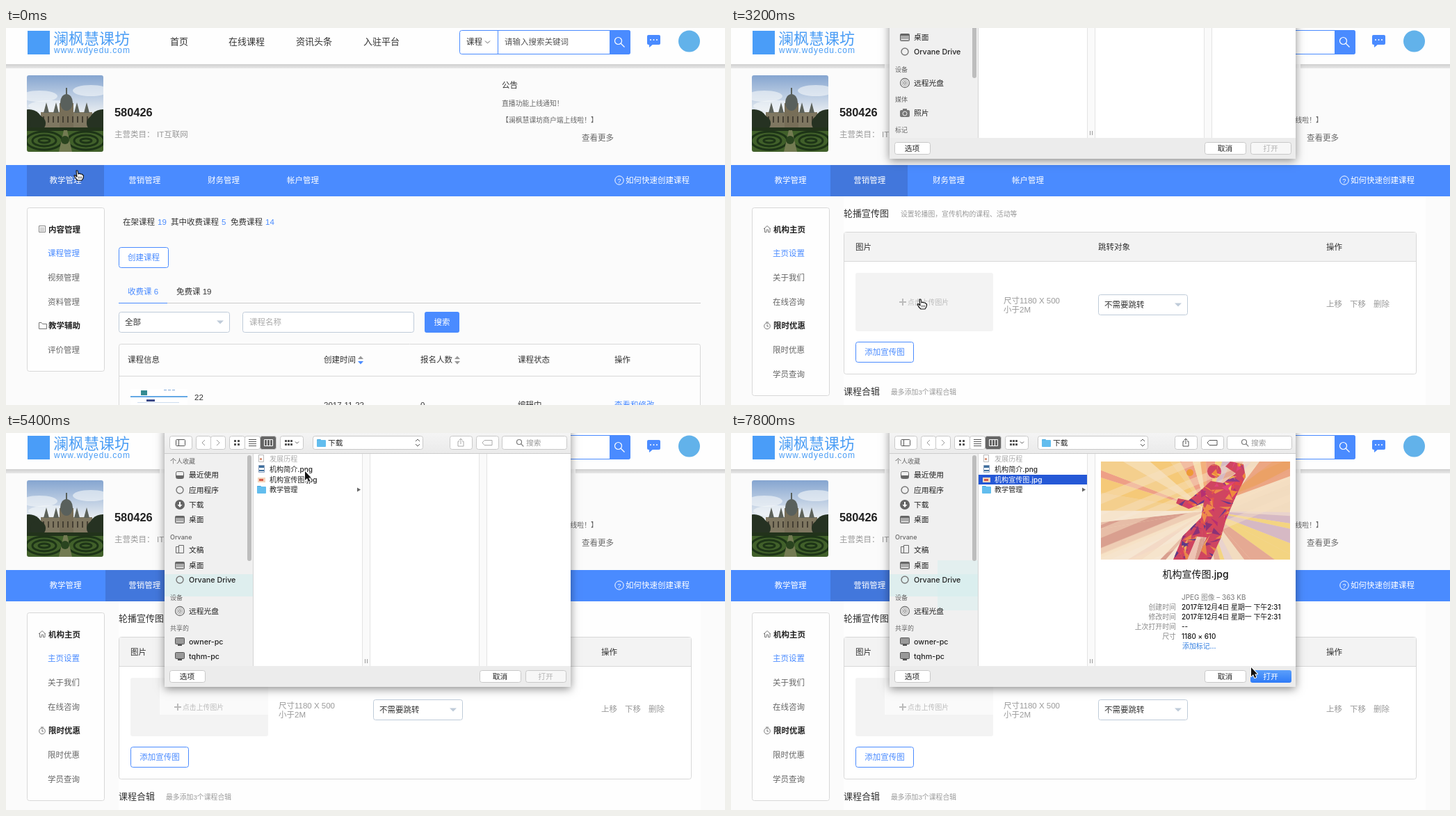
Animation, 1034 px wide and 542 px high, one loop 8000 ms. Source, as an HTML page with a canvas:

```html
<!DOCTYPE html>
<html lang="zh-CN">
<head>
<meta charset="utf-8">
<title>商户后台</title>
<style>
html, body { margin: 0; width: 100%; height: 100%; overflow: hidden; background: #fbfbfb; }
canvas { display: block; }
</style>
</head>
<body>
<canvas id="stage" width="1034" height="542"></canvas>
<script>
const c = document.getElementById('stage').getContext('2d');
const WEB = '"Liberation Sans", "Noto Sans CJK SC", "Noto Sans CJK", sans-serif';
const SYS = 'Inter, "Noto Sans CJK SC", "Noto Sans CJK", sans-serif';
const BLUE = '#4a8bff', INK = '#333', MID = '#666', PALE = '#999', LINE = '#d8d8d8', FIELD = '#bfcbd9';
const BRAND = '澜枫慧课坊';
const LOOP = 8000, STEP = 200;

// Text is placed by its left edge (or align) and its vertical centre.
function text(s, x, y, size = 11.5, color = INK, { weight = 400, align = 'left', font = WEB } = {}) {
  c.font = `${weight} ${size}px ${font}`;
  c.textAlign = align;
  c.fillStyle = color;
  c.fillText(s, x, y + size * 0.37);
}
const sys = (s, x, y, size, color, opt = {}) => text(s, x, y, size, color, { font: SYS, ...opt });

function rect(x, y, w, h, fill) {
  c.fillStyle = fill;
  c.fillRect(x, y, w, h);
}

function box(x, y, w, h, r, fill, stroke) {
  c.beginPath();
  c.roundRect(stroke ? x + 0.5 : x, stroke ? y + 0.5 : y, stroke ? w - 1 : w, stroke ? h - 1 : h, r);
  if (fill) { c.fillStyle = fill; c.fill(); }
  if (stroke) { c.strokeStyle = stroke; c.lineWidth = 1; c.stroke(); }
}

function trace(pts, close) {
  c.beginPath();
  for (let i = 0; i < pts.length; i += 2) c.lineTo(pts[i], pts[i + 1]);
  if (close) c.closePath();
}
function poly(pts, fill) { trace(pts, true); c.fillStyle = fill; c.fill(); }
function line(pts, color, width = 1) {
  trace(pts);
  c.strokeStyle = color;
  c.lineWidth = width;
  c.stroke();
}
function oval(x, y, rx, ry, fill) { c.beginPath(); c.ellipse(x, y, rx, ry, 0, 0, 7); c.fillStyle = fill; c.fill(); }
function disc(x, y, r, fill) { oval(x, y, r, r, fill); }
function ring(x, y, r, color, width = 1) {
  c.beginPath();
  c.arc(x, y, r, 0, 7);
  c.strokeStyle = color;
  c.lineWidth = width;
  c.stroke();
}
function fade(y0, y1, a, b) {
  const g = c.createLinearGradient(0, y0, 0, y1);
  g.addColorStop(0, a);
  g.addColorStop(1, b);
  return g;
}
function clipped(path, draw) {
  c.save();
  path();
  c.clip();
  draw();
  c.restore();
}
function lens(x, y, r, color) {
  ring(x, y, r, color, 1.2);
  line([x + r * 0.7, y + r * 0.7, x + r * 1.8, y + r * 1.8], color, 1.2);
}
function seeded(seed) {
  return () => (seed = (seed * 16807) % 2147483647) / 2147483647;
}

function header() {
  rect(0, 0, 1034, 52, '#fefefe');
  rect(0, 52, 1034, 6, fade(52, 58, '#cfcfcf', '#e8e8e8'));
  rect(31, 4, 32, 34, '#4a9df8');
  text(BRAND, 68, 15, 22, '#4a9df5', { weight: 500 });
  c.letterSpacing = '1px';
  text('www.wdyedu.com', 69, 32, 12, '#4a9df5');
  c.letterSpacing = '0px';
  ['首页', '在线课程', '资讯头条', '入驻平台'].forEach((s, i) => text(s, [236, 320, 417, 514][i], 19, 13));
  box(652, 3, 246, 35, 3, '#fff', BLUE);
  rect(707, 3, 1, 35, BLUE);
  box(868, 3, 30, 35, [0, 3, 3, 0], BLUE);
  text('课程', 662, 20);
  line([689, 18.5, 692.5, 22, 696, 18.5], MID);
  text('请输入搜索关键词', 717, 20, 11.5, '#555');
  lens(880.5, 18.5, 5, '#fff');
  box(922, 10, 19, 14, 2, BLUE);
  poly([925, 23, 931, 23, 925, 28], BLUE);
  for (const x of [927, 931.5, 936]) disc(x, 17, 1, '#fff');
  disc(982.5, 19, 15.5, '#62b2ea');
}

function photo() {
  clipped(() => { c.beginPath(); c.roundRect(30, 68, 110, 110, 3); }, () => {
    rect(30, 68, 110, 75, fade(68, 125, '#85a5d0', '#eef1f3'));
    for (const [x, y, w] of [[48, 98, 26], [122, 90, 26], [66, 112, 34]]) oval(x, y, w, 8, 'rgba(246,248,250,.6)');
    rect(50, 121, 74, 26, '#7f7761');
    rect(77, 108, 20, 39, '#776e58');
    oval(87, 107, 9, 12, '#59605c');
    rect(86, 86, 2, 11, '#59605c');
    for (const x of [58, 72, 102, 116]) poly([x - 4, 122, x, 107, x + 4, 122], '#5d625a');
    for (let x = 53; x < 122; x += 7) rect(x, 127, 2, 9, '#453f33');
    for (const [x, r] of [[33, 20], [46, 11], [127, 11], [139, 20]]) disc(x, 137, r, '#263222');
    rect(30, 146, 110, 32, '#41602a');
    rect(30, 143, 110, 5, '#22331b');
    for (const s of [-1, 1]) for (let i = 0; i < 3; i++) {
      c.beginPath();
      c.ellipse(85 + s * 30, 162, 8 + i * 9, 3 + i * 5, 0, 0, 7);
      c.strokeStyle = '#1d3417';
      c.lineWidth = 3;
      c.stroke();
    }
    poly([83, 147, 88, 147, 95, 178, 76, 178], '#737b52');
    disc(85, 161, 6, '#2a441f');
  });
}

function shop() {
  photo();
  text('580426', 156, 121, 16.4, '#222', { weight: 700 });
  text('主营类目：', 156, 153, 11.5, PALE);
  text('IT互联网', 217, 153, 11.5, PALE);
  text('公告', 713, 82);
  text('直播功能上线通知！', 713, 108, 9.85, MID);
  text(`【${BRAND}商户端上线啦！】`, 713, 132, 9.85, MID);
  text('查看更多', 828, 158, 11.5, MID);
}

function tabs(active) {
  rect(0, 197, 1034, 45, BLUE);
  rect(active ? 143 : 30, 197, 111, 45, '#4277dc');
  ['教学管理', '营销管理', '财务管理', '帐户管理'].forEach((s, i) => text(s, 62.5 + i * 113.8, 219, 11.5, '#fff'));
  ring(882, 219, 6.2, '#fff');
  text('?', 882, 219, 9.5, '#fff', { align: 'center' });
  text('如何快速创建课程', 891, 219, 11.5, '#fff');
}

// Entries starting with * are section heads; the first plain one is current.
function sidebar(items, h) {
  box(30, 258, 112, h, 3, '#fefefe', LINE);
  items.forEach((s, i) => {
    const y = 289.5 + i * 34.65;
    if (s[0] === '*') text(s.slice(1), 61, y, 11.5, '#222', { weight: 700 });
    else text(s, 60, y, 11.5, i === 1 ? BLUE : MID);
  });
}
function outlined(s, x, y, w) {
  box(x, y, w, 30, 3, '#fff', BLUE);
  text(s, x + w / 2, y + 14.5, 11.5, BLUE, { align: 'center' });
}
function picker(s, x, y, w) {
  box(x, y, w, 30, 3, '#fff', FIELD);
  text(s, x + 9, y + 15);
  const r = x + w - 19;
  poly([r, y + 12.5, r + 10, y + 12.5, r + 5, y + 17.5], FIELD);
}
function sorter(x, low) {
  poly([x - 4, 476, x + 4, 476, x, 471.5], '#999');
  poly([x - 4, 479, x + 4, 479, x, 483.5], low);
}

function courses() {
  sidebar(['*内容管理', '课程管理', '视频管理', '资料管理', '*教学辅助', '评价管理'], 236);
  box(47, 284, 10, 10, 0, null, '#888');
  for (const y of [287, 289, 291]) rect(49, y, 6, 1, '#aaa');
  line([47.5, 432.5, 47.5, 423.5, 51, 423.5, 52.5, 425.5, 58.5, 425.5, 58.5, 432.5, 47.5, 432.5], '#777');
  const y = 279;
  text('在架课程', 168, y);
  text('19', 218, y, 11.5, BLUE);
  text('其中收费课程', 237, y);
  text('5', 310, y, 11.5, BLUE);
  text('免费课程', 323, y);
  text('14', 373, y, 11.5, BLUE);
  outlined('创建课程', 162, 315, 72);
  text('收费课 6', 175, 379, 11.5, BLUE);
  text('免费课 19', 245, 379);
  rect(162, 395, 837, 1, '#ccc');
  rect(162, 395, 70, 1, BLUE);
  picker('全部', 162, 408, 160);
  box(340, 408, 247, 30, 3, '#fff', FIELD);
  text('课程名称', 350, 423, 11.5, '#aaa');
  box(602, 408, 50, 30, 3, BLUE);
  text('搜索', 627, 423, 11.5, '#fff', { align: 'center' });
  box(162, 454, 837, 120, 3, '#fdfdfd', LINE);
  rect(162, 500, 837, 1, LINE);
  const cols = [175, 457, 596, 736, 875];
  ['课程信息', '创建时间', '报名人数', '课程状态', '操作'].forEach((s, i) => text(s, cols[i], 477));
  sorter(510, BLUE);
  sorter(649, '#999');
  rect(179, 519, 82, 23, '#fff');
  rect(179, 529, 82, 2, '#65a9e5');
  rect(194, 521, 9, 7, '#348b91');
  rect(202, 534, 12, 3, '#3c4a88');
  for (const x of [227, 233, 239]) rect(x, 520, 4, 1, '#80a8d8');
  rect(189, 538, 60, 1, '#cddcee');
  text('22', 271, 531);
  text('2017-11-22', 457, 542);
  text('0', 596, 542);
  text('编辑中', 736, 542);
  text('查看和修改', 875, 542, 11.5, BLUE);
}

function promo(t) {
  rect(162, 242, 837, 300, '#fefefe');
  sidebar(['*机构主页', '主页设置', '关于我们', '在线咨询', '*限时优惠', '限时优惠', '学员查询'], 271);
  line([47, 289, 52, 284.5, 57, 289], '#777');
  line([48.5, 288, 48.5, 293.5, 51, 293.5, 51, 290, 53.5, 290, 53.5, 293.5, 56, 293.5, 56, 288], '#777');
  ring(52, 428.5, 4.3, '#777');
  line([52, 426, 52, 429, 54, 429], '#777');
  line([50, 423, 54, 423], '#777');
  text('轮播宣传图', 162, 266, 13);
  text('设置轮播图，宣传机构的课程、活动等', 244, 267, 9.85, PALE);
  box(162, 293, 824, 205, 3, '#fff', LINE);
  rect(163, 294, 822, 41, '#f3f3f3');
  rect(162, 335, 824, 1, LINE);
  text('图片', 179, 315);
  text('跳转对象', 528, 315);
  text('操作', 856, 315);
  box(179, 352, 198, 84, 3, '#f3f3f3');
  if (t >= 3400) rect(221, 352, 156, 53, '#fafafa');
  rect(242, 393, 10, 2, '#bbb');
  rect(246, 389, 2, 10, '#bbb');
  text('点击上传图片', 254, 394, 9.85, '#bbb');
  text('尺寸1180 X 500', 392, 392, 11.5, PALE);
  text('小于2M', 392, 405, 11.5, PALE);
  picker('不需要跳转', 528, 383, 129);
  ['上移', '下移', '删除'].forEach((s, i) => text(s, 856 + i * 34, 397, 11.5, PALE));
  outlined('添加宣传图', 179, 451, 84);
  text('课程合辑', 162, 522, 13);
  text('最多添加3个课程合辑', 230, 523, 9.85, PALE);
}

const icons = {
  tray(y) { box(244, y - 5, 12, 11, 2, null, MID); rect(245, y + 1, 10, 4, MID); },
  dot(y) { ring(250, y, 5, '#777', 1.4); },
  down(y) { disc(250, y, 7, MID); rect(249, y - 4, 2, 5, '#fff'); poly([246.5, y, 253.5, y, 250, y + 4], '#fff'); },
  desk(y) { box(243, y - 5, 14, 11, 1, '#aaa', MID); rect(244, y - 4, 12, 2, MID); rect(245, y + 3, 10, 1, '#eee'); },
  docs(y) { box(244, y - 5, 7, 10, 0, '#eee', MID); box(248, y - 7, 8, 12, 0, '#eee', MID); },
  disk(y) { ring(250, y, 6.5, '#777', 1.3); ring(250, y, 4, '#aaa'); ring(250, y, 1.8, '#777'); },
  screen(y) { box(243, y - 6, 14, 10, 1, '#999', '#555'); rect(247, y + 4, 6, 2, '#555'); },
  camera(y) { box(243, y - 4, 14, 10, 2, '#777'); rect(247, y - 6, 6, 3, '#777'); ring(250, y + 1, 3, '#eee'); },
};

function places(t) {
  const ready = t >= 3800;
  rect(228, 30, 128, 305, '#f0f0f0');
  if (ready) rect(228, 203, 128, 32, 'rgba(205,238,237,.5)');
  if (t >= 6200) rect(297, 183, 59, 72, 'rgba(215,240,239,.5)');
  rect(355, 30, 1, 305, '#d5d5d5');
  box(347, 32, 6, ready ? 152 : 217, 3, '#bdbdbd');
  const heads = [['个人收藏', 41], ['Orvane', 150], ['设备', 237]];
  const rows = [['最近使用', 60, 'tray'], ['应用程序', 82, 'dot'], ['下载', 103, 'down'], ['桌面', 124, 'desk'],
    ['文稿', 168, 'docs'], ['桌面', 190, 'desk'], ['Orvane Drive', 211, 'dot'], ['远程光盘', 256, 'disk']];
  if (ready) {
    heads.push(['共享的', 281]);
    rows.push(['owner-pc', 300, 'screen'], ['tqhm-pc', 321, 'screen']);
  } else {
    heads.push(['媒体', 280], ['标记', 324]);
    rows.push(['照片', 299, 'camera']);
  }
  for (const [s, y] of heads) sys(s, 236, y, 9, '#666', { weight: 500 });
  for (const [s, y, icon] of rows) {
    icons[icon](y);
    sys(s, 263, y, 10.75, '#222', { weight: 500 });
  }
}

function button(x, w, fill = '#fff', h = 20, y = 4) { box(x, y, w, h, 3, fill, '#c9c9c9'); }

function toolbar(t) {
  rect(228, 0, 584, 30, fade(0, 30, '#f4f4f4', '#eaeaea'));
  rect(228, 29, 584, 1, '#cdcdcd');
  const g = '#555', dim = t >= 6200 ? g : '#aaa';
  button(235, 33);
  box(244, 9, 14, 10, 1, null, g);
  rect(248, 9, 1, 10, g);
  button(273, 22);
  button(294, 22);
  line([286, 10, 282, 14, 286, 18], '#999');
  line([303, 10, 307, 14, 303, 18], '#999');
  button(321, 23);
  button(343, 23);
  button(365, 24, '#666');
  for (const x of [328, 333]) for (const y of [10, 15]) rect(x, y, 3, 3, g);
  for (const y of [10, 13, 16, 19]) rect(349, y - 1, 11, 1, g);
  box(371, 9, 13, 10, 0, null, '#fff');
  rect(375, 9, 1, 10, '#fff');
  rect(379, 9, 1, 10, '#fff');
  button(394, 34);
  for (const x of [401, 405, 409]) for (const y of [10, 15]) rect(x, y, 3, 3, g);
  line([416, 12.5, 418.5, 15, 421, 12.5], g);
  button(441, 159);
  folder(447, 14);
  sys('下载', 463, 14, 10.75, '#222');
  line([589, 12, 592, 9, 595, 12], g);
  line([589, 16, 592, 19, 595, 16], g);
  button(638, 33);
  line([652, 12, 650, 12, 650, 19, 658, 19, 658, 12, 656, 12], dim);
  line([654, 16, 654, 8], dim);
  line([651.5, 10.5, 654, 8, 656.5, 10.5], dim);
  button(676, 33);
  trace([685, 14, 688, 10.5, 699, 10.5, 699, 17.5, 688, 17.5], true);
  c.strokeStyle = dim;
  c.stroke();
  button(713, 94);
  lens(738, 13, 3.5, '#777');
  sys('搜索', 748, 14, 10.75, '#999');
}

function folder(x, y) {
  box(x, y - 5, 6, 4, 1, '#4aa7dc');
  box(x, y - 4, 13, 10, 1, '#62bdee');
}

function files(t) {
  const picked = t >= 6200;
  if (picked) rect(356, 60, 156, 14, '#2558d6');
  box(363, 31, 8, 11, 0, '#fff', '#bbb');
  rect(365, 36, 3, 3, '#d89880');
  box(363, 46, 9, 11, 0, '#fff', '#8ba0bd');
  rect(364, 47, 7, 3, '#3e6f9d');
  rect(364, 53, 7, 2, '#3e6f9d');
  rect(362, 64, 11, 7, '#f4d6bd');
  rect(364, 66, 6, 3, '#d65a48');
  folder(361, 81);
  sys('发展历程', 379, 37, 10.1, '#aaa');
  const opt = { weight: 500 };
  sys('机构简介.png', 379, 52, 10.1, '#222', opt);
  sys('机构宣传图.jpg', 379, 67, 10.1, picked ? '#fff' : '#222', opt);
  sys('教学管理', 379, 81.5, 10.1, '#222', opt);
  poly([505, 78.5, 510, 81.5, 505, 84.5], MID);
}

function artwork() {
  const rnd = seeded(77), pick = a => a[Math.floor(rnd() * a.length)];
  const warm = ['#f5c978', '#f3b07c', '#f6dcae', '#ee9f86', '#f4cf8d'];
  const cream = ['#f6e6d2', '#eec3b4', '#f3d9c6', '#d99f8f', '#e6bda9'];
  const cool = ['#e9d3cd', '#d6b9c4', '#f2dcc0', '#e5a993', '#f3d481'];
  const top = ['#e0484c', '#ef8a3d', '#f4bd4c', '#e2437a', '#8e3a86'];
  const middle = ['#d93a68', '#b62f72', '#e2544a', '#6b3a8c', '#ee8a4a'];
  const low = ['#e98548', '#5d3a88', '#d8465a', '#f1ab5c', '#8a3277'];

  clipped(() => { c.beginPath(); c.rect(532, 41, 272, 141); }, () => {
    rect(532, 41, 272, 141, '#f3d8b5');
    // Rays opening out behind the player.
    for (let a = 0; a < Math.PI * 2;) {
      const b = a + 0.06 + rnd() * 0.16;
      const set = Math.cos(a) > 0 ? cool : Math.sin(a) < 0 ? warm : cream;
      poly([685, 112, 685 + 260 * Math.cos(a), 112 + 260 * Math.sin(a),
        685 + 260 * Math.cos(b), 112 + 260 * Math.sin(b)], pick(set));
      a = b;
    }
    for (let i = 0; i < 7; i++) {
      const y = 70 + rnd() * 130;
      poly([532, y, 804, y - 110, 804, y - 100, 532, y + 14], 'rgba(247,225,196,.45)');
    }
    poly([804, 41, 760, 41, 722, 92, 804, 62], 'rgba(229,120,80,.55)');
    disc(660, 57, 5, '#ee9a35');
    const body = () => {
      trace([676, 82, 690, 69, 708, 72, 726, 58, 711, 48, 718, 41, 737, 45, 740, 63, 726, 91, 712, 124,
        704, 152, 690, 182, 671, 182, 684, 150, 670, 149, 656, 182, 636, 182, 650, 148, 676, 122,
        680, 100, 658, 109, 640, 101, 643, 94, 658, 97], true);
      c.moveTo(705, 55);
      c.arc(695, 55, 10, 0, 7);
    };
    clipped(body, () => {
      rect(630, 41, 120, 141, '#cf4560');
      for (let i = 0; i < 220; i++) {
        const x = 632 + rnd() * 112, y = 41 + rnd() * 141, d = () => rnd() * 26 - 13;
        poly([x, y, x + d(), y + d(), x + d(), y + d()], pick(y < 85 ? top : y < 125 ? middle : low));
      }
    });
  });
}

function preview(t) {
  if (t >= 6600) artwork();
  const bold = { weight: 500 };
  sys('机构宣传图.jpg', 668, 203, 14, '#111', { align: 'center', ...bold });
  sys('JPEG 图像 – 363 KB', 648, 236, 9.9, '#888', bold);
  const stamp = '2017年12月4日 星期一 下午2:31';
  [['创建时间', stamp], ['修改时间', stamp], ['上次打开时间', '--'], ['尺寸', '1180 × 610']].forEach(([k, v], i) => {
    sys(k, 640, 250 + i * 14, 9.9, '#888', { align: 'right', ...bold });
    sys(v, 648, 250 + i * 14, 9.9, '#111', bold);
  });
  sys('添加标记…', 649, 306, 9.9, '#2f7de0', bold);
}

function dialog(t) {
  const bottom = Math.min(365, 188 + (t - 3200) * 0.885);
  if (bottom <= 0) return;
  rect(221, 52, 598, 6, 'rgba(251,251,251,.85)');
  c.save();
  c.translate(0, bottom - 365);
  c.shadowColor = 'rgba(0,0,0,.45)';
  c.shadowBlur = 12;
  c.shadowOffsetY = 3;
  rect(228, -10, 584, 375, '#ececec');
  c.shadowColor = 'transparent';
  toolbar(t);
  rect(356, 30, 456, 305, '#fff');
  places(t);
  const picked = t >= 6200;
  for (const x of picked ? [512] : [512, 680]) {
    rect(x, 30, 12, 305, '#fafafa');
    rect(x, 30, 1, 305, '#e4e4e4');
    rect(x + 11, 30, 1, 305, '#e4e4e4');
  }
  rect(516, 325, 1, 6, '#999');
  rect(519, 325, 1, 6, '#999');
  if (t >= 3800) files(t);
  if (picked) preview(t);
  button(235, 52, '#fff', 18, 341);
  sys('选项', 260.5, 350, 10.75, '#222', { align: 'center', weight: 500 });
  button(681, 60, '#fff', 18, 341);
  sys('取消', 710.5, 350, 10.75, '#222', { align: 'center', weight: 500 });
  if (picked) box(747, 341, 59, 18, 3, fade(341, 359, '#5b9ffb', '#2f7bf7'));
  else button(747, 59, '#f7f7f7', 18, 341);
  sys('打开', 776, 350, 10.75, picked ? '#fff' : '#b5b5b5', { align: 'center' });
  c.restore();
}

const route = [
  [0, 102, 205], [200, 104, 205], [1000, 224, 219], [1600, 224, 219], [2400, 264, 354], [2800, 272, 390],
  [3800, 272, 390], [4200, 299, 353], [4800, 421, 74], [5400, 430, 55], [6000, 427, 64], [6600, 427, 64],
  [7000, 311, 352], [7200, 379, 350], [7600, 660, 290], [7800, 748, 337],
];

function pointer(t) {
  const i = Math.max(1, route.findIndex(p => p[0] >= t));
  const [t0, x0, y0] = route[i - 1], [t1, x1, y1] = route[i];
  const k = (t - t0) / (t1 - t0);
  return [Math.round(x0 + (x1 - x0) * k), Math.round(y0 + (y1 - y0) * k)];
}

function cursor(t, [x, y]) {
  const hand = t < 1800 || (t >= 2600 && t < 4000);
  c.save();
  c.translate(x, y);
  c.lineJoin = 'round';
  if (hand) {
    trace([-1, 0, 1, 0, 2, 5, 4, 4, 5, 5, 7, 5, 8, 6, 9.5, 7, 9, 11, 7, 14, 1, 14, -2, 11, -4, 7, -2.5, 6.5, 0, 9], true);
    c.fillStyle = '#fff';
    c.strokeStyle = '#111';
    c.lineWidth = 1.2;
    c.fill();
    c.stroke();
    for (const u of [2.5, 4.5, 6.5]) line([u, 8.5, u, 11.5], '#333', 0.8);
  } else {
    trace([0, 0, 0, 13, 3, 10, 5.2, 15, 7.3, 14, 5.2, 9.5, 9, 9.5], true);
    c.strokeStyle = '#fff';
    c.lineWidth = 2;
    c.stroke();
    c.fillStyle = '#111';
    c.fill();
  }
  c.restore();
}

function draw(t) {
  const at = pointer(t);
  rect(0, 0, 1034, 542, '#fbfbfb');
  header();
  shop();
  tabs(at[0] > 143 || t > 1000);
  if (t < 1800) courses();
  else promo(t);
  if (t >= 3000) dialog(t);
  cursor(t, at);
}

const start = performance.now();
function tick() {
  const t = (performance.now() - start) % LOOP;
  draw(Math.floor(t / STEP) * STEP);
  requestAnimationFrame(tick);
}
tick();
</script>
</body>
</html>
```
